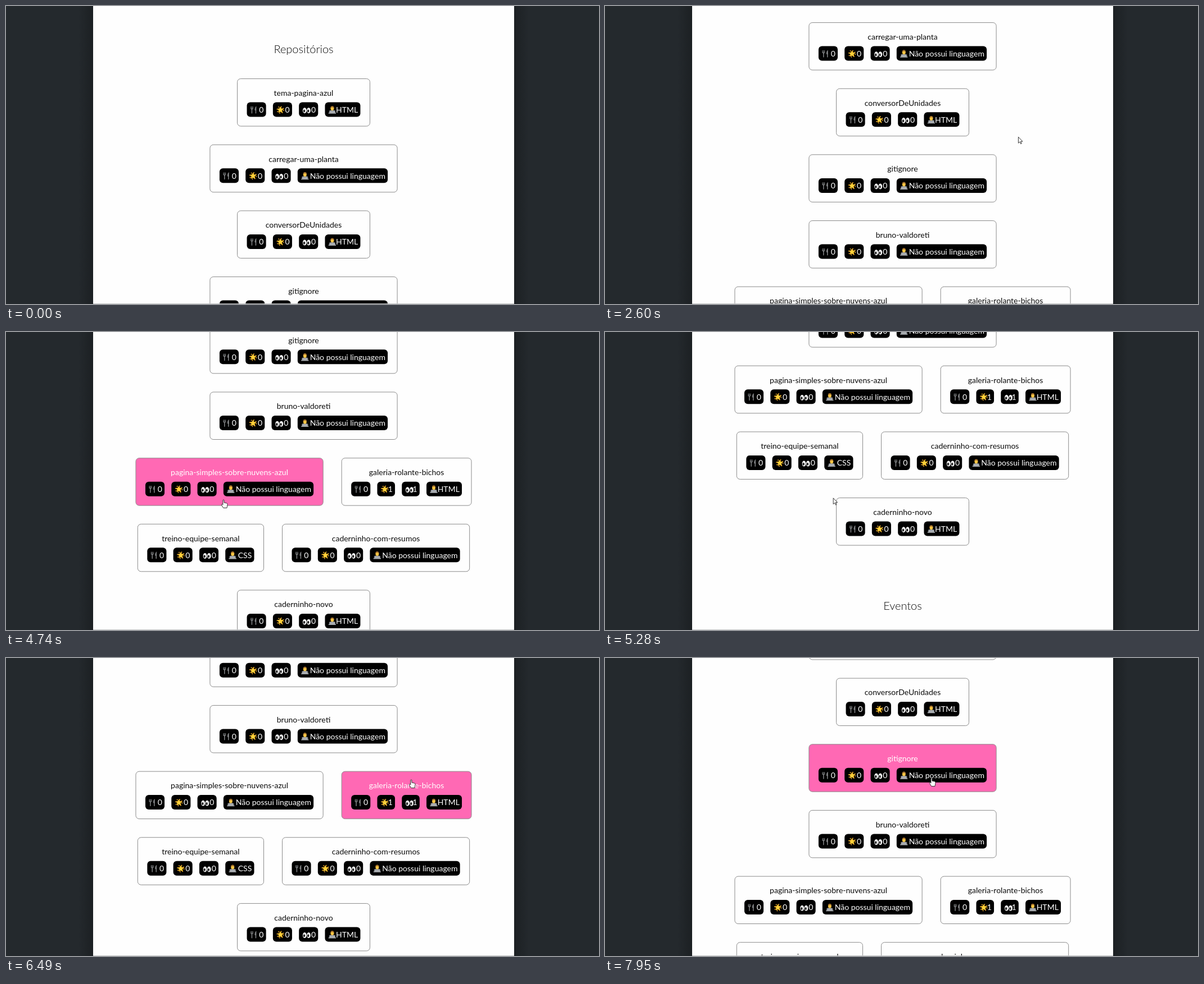
An HTML page that plays this animation: 1055x531 px, repeating every 8000 ms.

```html
<!DOCTYPE html>
<html lang="pt-BR">
<head>
<meta charset="utf-8">
<title>Repositórios</title>
<style>
  html, body { margin: 0; width: 100%; height: 100%; overflow: hidden; }
  svg { display: block; width: 100%; height: 100%; }
  text { font: 14px Lato, "Open Sans", sans-serif; }
  .heading { font-size: 20px; font-weight: 300; fill: #0c0c0c; text-anchor: middle; }
  .title { text-anchor: middle; }
  .label { fill: #fff; text-anchor: end; }
  .card { stroke: #8b8b8b; }
</style>
</head>
<body>
<svg viewBox="0 0 1055 531">
  <defs>
    <linearGradient id="shade">
      <stop offset="0" stop-color="#24292d"/>
      <stop offset="1" stop-color="#1c2023"/>
    </linearGradient>
    <g id="fork" fill="none" stroke="#8d8f91" stroke-linecap="round">
      <path d="M.8 .8V4M2.6 .8V4M4.4 .8V4" stroke-width=".9"/>
      <path d="M.8 4Q2.6 6.5 4.4 4" stroke-width="1.2"/>
      <path d="M2.6 5.5V12.3M9.6 7V12.3" stroke-width="1.4"/>
      <path d="M9.9 .6Q8 2 8 7H9.9Z" fill="#8d8f91" stroke-width=".6"/>
    </g>
    <g id="star">
      <circle cx="7" cy="7" r="5.7" fill="none" stroke="#dfa02c" stroke-width="2" stroke-dasharray="1.7 2.78"/>
      <path d="M7 1.8 8.6 4.9 12 5.4 9.6 7.9 10.1 11.4 7 9.9 3.9 11.4 4.4 7.9 2 5.4 5.4 4.9Z"
            fill="#ffd23c" stroke="#ffc52e" stroke-linejoin="round"/>
    </g>
    <g id="eyes">
      <ellipse cx="3.8" cy="5.7" rx="3.4" ry="5" fill="#f4f4f4"/>
      <ellipse cx="11" cy="5.7" rx="3.4" ry="5" fill="#f4f4f4"/>
      <ellipse cx="3" cy="6.4" rx="1.7" ry="2.5" fill="#222"/>
      <ellipse cx="10.2" cy="6.4" rx="1.7" ry="2.5" fill="#222"/>
    </g>
    <g id="coder">
      <path d="M1 13V10Q1 7.6 4 7.6H9.5Q12.4 7.6 12.4 10V13Z" fill="#777b80"/>
      <ellipse cx="6.7" cy="4.4" rx="3" ry="3.8" fill="#f6c544"/>
      <path d="M3.6 4Q3.4 .2 6.7 .2T9.8 4Q8.5 2.2 6.7 2.4T3.6 4Z" fill="#a5712d"/>
      <path d="M2.6 8.4H10.8L11.5 12.2H13.3V13.6H0V12.2H1.9Z" fill="#a9adb1"/>
    </g>
  </defs>
  <rect width="1055" height="531" fill="#24292d"/>
  <rect x="129" width="26" height="531" fill="url(#shade)"/>
  <rect x="-930" width="26" height="531" fill="url(#shade)" transform="scale(-1 1)"/>
  <rect x="155" width="749" height="531" fill="#fefefe"/>
  <g id="page">
    <text class="heading" x="529.5" y="83.5">Repositórios</text>
    <text class="heading" x="529.5" y="1153">Eventos</text>
  </g>
  <g id="cursor" fill="#fff" stroke="#222" stroke-width=".9" stroke-linejoin="round">
    <path id="arrow" d="M.4 .4V11.3L2.9 8.9 4.6 12.7 6.2 12 4.6 8.3H7.9Z"/>
    <path id="hand" d="M-1.1 1C-1.1 -.4 1 -.4 1 1V5L5.6 6Q7.3 6.4 7 8.6L6 14.5H-.3L-3.4 9.5Q-4 7.6 -2.5 7.7L-1.1 9Z"/>
  </g>
  <path d="M155 530.5H904" stroke="#c4c6c7"/>
</svg>
<script>
const LOOP = 8000, STEP = 67, FIRST_MOVE = 640, FADE = 260;
const NOTCH = 82.2, NOTCH_TIME = 200;
const CENTER = 529.5, FIRST_ROW = 129.6, ROW_PITCH = 117.65, CARD_HEIGHT = 84.5;
const PAD = 17, PILL_GAP = 12.2, CARD_GAP = 33;
const NONE = 'Não possui linguagem';
const LANGUAGE_WIDTH = { HTML: 63, CSS: 51.3, [NONE]: 160.3 };

// Each card: title, language, stars and watchers
const rows = [
  [['tema-pagina-azul', 'HTML']],
  [['carregar-uma-planta', NONE]],
  [['conversorDeUnidades', 'HTML']],
  [['gitignore', NONE]],
  [['bruno-valdoreti', NONE]],
  [['pagina-simples-sobre-nuvens-azul', NONE], ['galeria-rolante-bichos', 'HTML', 1]],
  [['treino-equipe-semanal', 'CSS'], ['caderninho-com-resumos', NONE]],
  [['caderninho-novo', 'HTML']],
];

// Wheel turns: start time, notches
const wheel = [[1950, 2], [2477, 1], [3110, 2], [3920, 1], [4780, 2], [6017, -1], [6320, -2], [7190, -1]];

// Pointer moves: start time, duration, destination
const moves = [
  [590, 450, 764, 276], [1250, 150, 782, 264], [1400, 250, 735, 233],
  [3540, 270, 799, 257], [4200, 500, 387, 299], [5220, 390, 711, 238],
  [5660, 320, 721, 217], [6670, 230, 671, 211], [7430, 500, 581, 214],
];

const byId = id => document.getElementById(id);
const clamp = v => Math.max(0, Math.min(1, v));
const ease = p => { p = clamp(p); return p * p * (3 - 2 * p); };

const scrollAt = t => wheel.reduce((sum, [start, count]) =>
  sum + NOTCH * count * ease((t - start) / (NOTCH_TIME * Math.abs(count))), 0);

const pointerAt = t => moves.reduce(([x, y], [start, duration, toX, toY]) => {
  const p = ease((t - start) / duration);
  return [x + (toX - x) * p, y + (toY - y) * p];
}, [1000, 500]);

function add(parent, tag, attrs, text) {
  const node = document.createElementNS('http://www.w3.org/2000/svg', tag);
  for (const name in attrs) node.setAttribute(name, attrs[name]);
  if (text !== undefined) node.textContent = text;
  return parent.appendChild(node);
}

function buildCard([name, language, count = 0]) {
  const group = add(byId('page'), 'g', {});
  const box = add(group, 'rect', { class: 'card', height: CARD_HEIGHT, rx: 6, fill: '#ff69b4' });
  const countWidth = count === 1 ? 31.6 : 34.1;
  let x = PAD;
  const pill = (icon, dy, label, width) => {
    add(group, 'rect', { x, y: 42, width, height: 26, rx: 6 });
    add(group, 'use', { href: '#' + icon, x: x + 6.3, y: 42 + dy });
    add(group, 'text', { class: 'label', x: x + width - 4.2, y: 60.3 }, label);
    x += width + PILL_GAP;
  };
  pill('fork', 7, 0, 34.1);
  pill('star', 6.5, count, countWidth);
  pill('eyes', 9, count, countWidth);
  pill('coder', 6.5, language, LANGUAGE_WIDTH[language]);
  const width = x - PILL_GAP + PAD;
  box.setAttribute('width', width);
  const title = add(group, 'text', { class: 'title', x: width / 2, y: 30.3 }, name);
  return { group, box, title, width };
}

function buildRow(row, index) {
  const cards = row.map(buildCard);
  const total = cards.reduce((sum, card) => sum + card.width + CARD_GAP, -CARD_GAP);
  let left = CENTER - total / 2;
  for (const card of cards) {
    card.left = left;
    card.top = FIRST_ROW + index * ROW_PITCH;
    card.group.setAttribute('transform', `translate(${card.left} ${card.top})`);
    left += card.width + CARD_GAP;
  }
  return cards;
}

const cards = rows.flatMap(buildRow);

// Precompute each step, so hover fades follow from the pointer and the scroll.
function buildSteps() {
  const steps = [];
  let glow = cards.map(() => 0);
  for (let k = 0; k * STEP + FIRST_MOVE < LOOP; k++) {
    const t = FIRST_MOVE + 14 + k * STEP;
    const scroll = scrollAt(t);
    const [x, y] = pointerAt(t);
    const isOver = ({ left, top, width }) => x > left && x < left + width &&
      y + scroll > top && y + scroll < top + CARD_HEIGHT;
    const target = cards.findIndex(isOver);
    glow = glow.map((v, i) => clamp(v + (i === target ? STEP : -STEP) / FADE));
    steps.push({ scroll, x, y, glow, over: target >= 0 });
  }
  return steps;
}

const steps = buildSteps();
const page = byId('page'), cursor = byId('cursor');
const show = (node, visible) => { node.style.display = visible ? '' : 'none'; };

function render(time) {
  const index = Math.floor((time - FIRST_MOVE) / STEP);
  const { scroll, x, y, glow, over } = steps[Math.max(0, index)];
  page.setAttribute('transform', `translate(0 ${-scroll})`);
  cursor.setAttribute('transform', `translate(${x} ${y})`);
  show(cursor, index >= 0);
  show(byId('arrow'), !over);
  show(byId('hand'), over);
  cards.forEach(({ box, title }, i) => {
    const shade = Math.round(12 + 243 * glow[i]);
    box.setAttribute('fill-opacity', glow[i]);
    title.setAttribute('fill', `rgb(${shade},${shade},${shade})`);
  });
}

function tick() {
  render(performance.now() % LOOP);
  requestAnimationFrame(tick);
}
tick();
</script>
</body>
</html>
```
